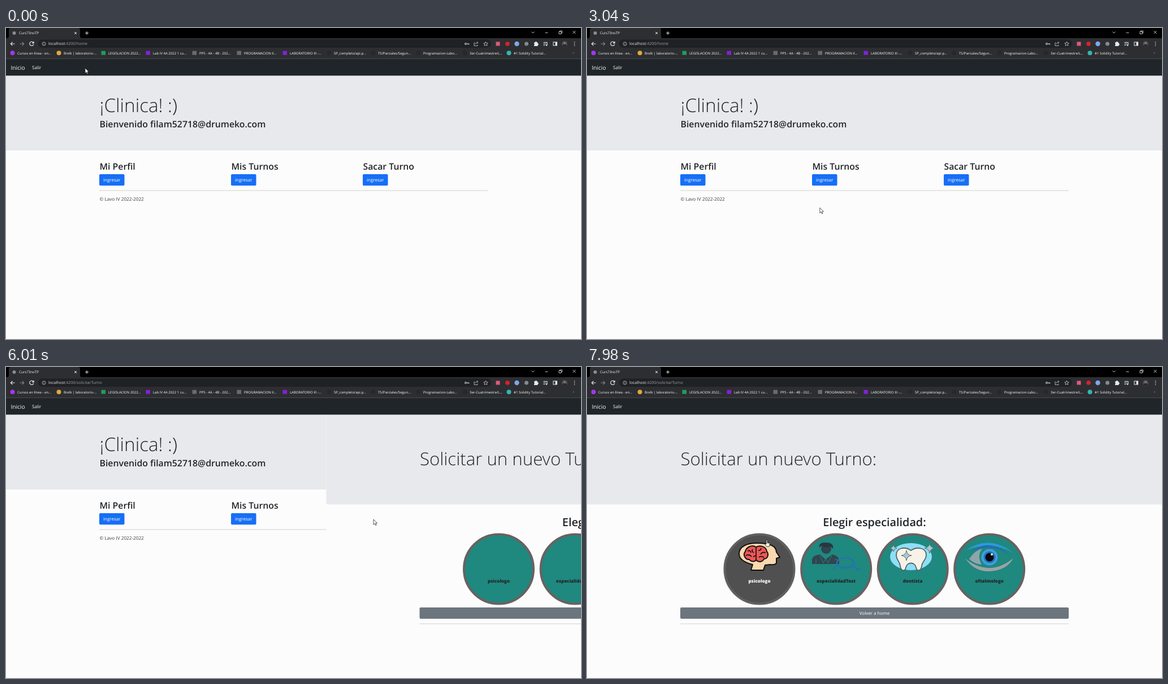
An HTML page for the animation above (8 s loop, 1017 px wide and 551 px high).

```html
<!DOCTYPE html>
<html lang="es">
<head>
<meta charset="utf-8">
<title>Clinica</title>
<style>
html, body { margin: 0; width: 100%; height: 100%; overflow: hidden; background: #fcfcfc; }
svg { display: block; width: 1017px; height: 551px; }
text { font-family: "Open Sans", "Noto Sans", sans-serif; text-rendering: geometricPrecision; white-space: pre; }
</style>
</head>
<body>
<svg id="stage" viewBox="0 0 1017 551"></svg>
<script>
const LOOP = 8000, CLICK = 5600, SLIDE = 5800, SLIDE_MS = 456.8, IMAGES = 6850;
const INK = '#212529', BLUE = '#166ff6', BAR = '#2d2e31', HERO = '#e8e9ec';

const text = (x, y, size, str, fill = INK, more = '') =>
  `<text x="${x}" y="${y}" font-size="${size}" fill="${fill}" ${more}>${str}</text>`;
const rect = (x, y, w, h, fill, more = '') =>
  `<rect x="${x}" y="${y}" width="${w}" height="${h}" fill="${fill}" ${more}/>`;
const dot = (x, y, r, fill, more = '') =>
  `<circle cx="${x}" cy="${y}" r="${r}" fill="${fill}" ${more}/>`;
const path = (d, fill = 'none', stroke = 'none', w = 1, more = '') =>
  `<path d="${d}" fill="${fill}" stroke="${stroke}" stroke-width="${w}" ${more}/>`;
const line = (d, color = '#e8eaed', w = 1) => path(d, 'none', color, w);
const MID = 'text-anchor="middle"';

// --- browser window ---
const bookmarks = [
  [20, 'Cursos en línea - en...', '#a435f0', 1],
  [102, 'Brelk | laboratorio-...', '#e0a83c', 1],
  [181, 'LEGISLACION 2022...', '#1e9e5a'],
  [260, 'Lab IV 4A 2022 1 cu...', '#8420d8'],
  [342, 'PPS - 4A - 4B - 202...', '#6a6b6e'],
  [421, 'PROGRAMACION II...', '#6a6b6e'],
  [502, 'LABORATORIO III -...', '#8420d8'],
  [580, 'SP_completo/api.p...', '#25282c', 1],
  [658, 'TS/Parciales/Segun...', '#25282c', 1],
  [738, 'Programacion-Labo...', '#25282c', 1],
  [820, '3er-Cuatrimestre/L...', '#25282c', 1],
  [898, '#1 Solidity Tutorial...', '#35b5b0', 1]
];

const chrome = () =>
  rect(0, 0, 1017, 18, '#000') +
  path('M2 18Q5 18 5 14V3Q5 0 9 0H127Q131 0 131 3V14Q131 18 134 18Z', BAR) +
  rect(0, 18, 1017, 37, BAR) +
  rect(57, 20.5, 801, 14.5, '#202124', 'rx="7.2"') +
  dot(14.5, 9, 3, '#8b8d90') +
  text(23, 11.2, 6.2, 'Curs73noTP', '#fff') +
  line('M121 7l4 4m0-4l-4 4M140 9h6m-3-3v6') +
  // window buttons
  line('M929.5 6.5l2.5 2.5 2.5-2.5M953.5 8.5h5M978 6.5h4v4h-4zM979.5 6.5v-1.5h4v4h-1.5M1002.5 5l5 5m0-5l-5 5', '#e8eaed', .8) +
  // navigation
  line('M15.5 28h-7m3-3.2l-3.2 3.2 3.2 3.2M48.6 26.2a3.6 3.6 0 1 0 .2 2.8M49 24v2.8h-2.8', '#e8eaed', 1.2) +
  line('M24.5 28h7m-3-3.2l3.2 3.2-3.2 3.2', '#85878a', 1.1) +
  dot(67, 28, 3.1, 'none', 'stroke="#c8cace" stroke-width=".8"') +
  line('M67 27.6v2.2M67 26v.8', '#c8cace', .8) +
  // address actions
  dot(813, 28, 1.5, 'none', 'stroke="#d0d2d5" stroke-width="1"') +
  line('M814.5 28h4.2v1.6M816.8 28v1.3', '#d0d2d5', 1.1) +
  line('M829 26h-1v5.5h6v-2M830 29q0-3 4.5-3m-1.7-1.7l2 1.7-2 1.7', '#d0d2d5', .8) +
  path('M848.5 24.3l1.1 2.5 2.7.2-2 1.8.6 2.6-2.4-1.4-2.4 1.4.6-2.6-2-1.8 2.7-.2z', 'none', '#d0d2d5', .8) +
  // extensions
  rect(866.5, 24.5, 7, 7, '#e0597c') + dot(887, 28, 3.8, '#d8222a') +
  dot(903.5, 28, 4.2, '#7fa6ea') + dot(920.5, 28, 3.5, '#85888c') +
  path('M934 25.5h2a1.4 1.4 0 0 1 2.8 0h1.7v2a1.4 1.4 0 0 1 0 2.8v1.7h-6.5v-2a1.3 1.3 0 0 0 0-2.4z', '#e8eaed') +
  line('M950.5 25.5h7M950.5 28h4.5M950.5 30.5h3M957 26v4.5', '#e8eaed', 1.1) +
  dot(956, 30.5, 1.2, '#e8eaed') +
  rect(968, 25, 6.5, 6, 'none', 'stroke="#e8eaed"') + rect(971.5, 25, 3, 6, '#e8eaed') +
  dot(988, 28, 4.8, '#55504d') + dot(988, 26.7, 1.7, '#8c8079') + path('M984.5 31q3.5-4 7 0-3.5 3-7 0', '#242426') +
  [25, 28, 31].map(y => dot(1005.5, y, .8, '#e8eaed')).join('') +
  bookmarks.map(([x, label, color, round]) =>
    (round ? dot(x - 8.5, 44.3, 4, color) : rect(x - 12.5, 40.7, 7.5, 7, color)) +
    text(x, 46.5, 6.03, label, '#fff')).join('') +
  text(1002, 46, 6.5, '»', '#85878a') +
  rect(0, 54, 1017, 1, '#4a4b4f') +
  rect(0, 55, 1017, 29.4, '#1f2528') +
  text(8.5, 73.8, 10.1, 'Inicio', '#fff') + text(46, 72.7, 8.15, 'Salir', '#fff');

// --- pages ---
const buttons = [[165, 'Mi Perfil'], [398, 'Mis Turnos'], [631, 'Sacar Turno']];
const home = () =>
  rect(0, 84, 1017, 133, HERO) +
  text(165.5, 148.5, 33.2, '¡Clinica! :)', INK, 'font-weight="300"') +
  text(165.5, 175.7, 15.8, 'Bienvenido filam52718@drumeko.com', INK, 'font-weight="600"') +
  buttons.map(([x, title], i) =>
    text(x + .5, 251, 15.8, title, INK, 'font-weight="600"') +
    rect(x - 1, 258, 46.5, 22.3, '#8bbaf9', `rx="3" id="ring${i}" visibility="hidden"`) +
    rect(x, 259, 44.5, 20.3, BLUE, `rx="2" id="btn${i}"`) +
    text(x + 22.2, 271.8, 8, 'ingresar', '#fff', MID)).join('') +
  rect(165, 287.5, 687, 1, '#cfcfc8') +
  text(165.5, 306, 8.2, '© Lavo IV 2022-2022', '#3a3e42');

const head = path('M290 360L293 350C281 347 269 342 269 331C269 317 284 312 301 312C322 312 335 317 335 328L341 337L335 339V347Q334 351 324 350L315 351L312 360Z', '#fbd9ae', '#111', 2, 'stroke-linejoin="round"') +
  path('M299 319C291 314 281 320 280 327C275 332 280 342 287 341C291 346 297 345 299 342C304 347 311 345 313 340C320 340 322 331 318 327C317 318 306 315 299 319Z', '#ef5656', '#111', 2) +
  line('M299 319V342M284 326q5-2 6 3M281 334q6-3 10 2M293 323q-3 3 2 6M294 336l5-2M303 325q5 0 5-4M316 329q-6-2-9 3M304 337q6-3 9 1', '#111', 1.7);
const doctor = dot(423, 322, 9, '#30454f') +
  path('M411 320Q409 311 422 311Q437 311 435 322L431 318Q421 321 414 317Z', '#273640') +
  path('M398 349V340Q399 334 412 332L422 341L434 332Q444 334 446 342V349Z', '#30454f') +
  line('M412 334l6 13 4-7 4 7 7-13M405 341v7M438 341h4', '#1f887f', 1) +
  path('M469 352L482 360', 'none', '#2373b0', 3) +
  `<ellipse cx="457" cy="347" rx="15" ry="9" fill="none" stroke="#2373b0" stroke-width="2.4"/>` +
  line('M440 352q-3 6-6 6', '#2373b0', 2);
const spark = (x, y, r) =>
  path(`M${x} ${y - r}Q${x + 1} ${y - 1} ${x + r} ${y}Q${x + 1} ${y + 1} ${x} ${y + r}Q${x - 1} ${y + 1} ${x - r} ${y}Q${x - 1} ${y - 1} ${x} ${y - r}Z`, '#a9c9cc', '#586b74', 1);
const tooth = `<ellipse cx="573" cy="336" rx="37" ry="24" fill="#8edff5"/>` +
  path('M573 325C561 317 547 321 547 333C547 342 553 344 554 352C555 362 563 363 564 355C566 345 580 345 582 355C583 363 591 362 592 352C593 344 600 342 600 333C600 321 585 317 573 325Z', '#f6f2e7', '#56636b', 1.8) +
  spark(606, 321, 9) + spark(565, 334, 9) + spark(542, 321, 6);
const eye = path('M670 325Q711 296 754 329Q713 306 670 325Z', '#2b9bdc') +
  path('M676 329Q711 301 747 332Q711 310 676 329Z', '#236fae') +
  path('M669 339Q688 367 721 361Q744 357 754 339Q731 357 709 356Q686 354 669 339Z', '#9ba3a7') +
  path('M676 340Q687 324 699 322Q689 334 698 350Q684 349 676 340Z', '#8fa5aa') +
  dot(712, 337, 14.5, '#409fdf') + dot(712, 337, 10.5, '#2473b9') +
  dot(712, 337, 7.5, '#080b10') + dot(716, 332, 2, '#d8efff');

const specialties = [[305, 'psicologo'], [440.7, 'especialidadTest'], [576.2, 'dentista'], [711.7, 'oftalmologo']];
const booking = () =>
  rect(0, 84, 1017, 467, '#fcfcfc') +
  path('M0 84H1017V243.5H3Q0 243.5 0 240.5Z', HERO) +
  text(165.5, 174, 31.2, 'Solicitar un nuevo Turno:', INK, 'font-weight="300"') +
  text(508.5, 281.7, 19.8, 'Elegir especialidad:', INK, `${MID} font-weight="600"`) +
  specialties.map(([x], i) =>
    dot(x, 358, 61.5, '#1f887f', `stroke="#6a6160" stroke-width="4" id="disc${i}"`)).join('') +
  `<g id="images">${head + doctor + tooth + eye}</g>` +
  specialties.map(([x, name], i) =>
    text(x, 382.4, 8, name, INK, `${MID} font-weight="800" id="name${i}"`)).join('') +
  rect(165, 426, 687, 20, '#6c757d', 'rx="2"') +
  text(508.5, 439, 8, 'Volver a home', '#fff', MID) +
  rect(165, 454.5, 687, 1, '#cfd0d2');

const arrow = path('M0 0V9.3L2.2 7.3L3.7 10.6L5.2 9.9L3.7 6.7H6.5Z', '#fff', '#111', .7);
const hand = path('M-1 .8Q0-.8 1 .8V5L4.5 5.7Q5.5 6 5.3 8L4.5 12H-.5L-3.3 8Q-3.5 6.5-1 8Z', '#fff', '#111', .8) +
  line('M1 5v2M2.7 5.5v1.7M4.2 6v1.4', '#111', .5);

document.getElementById('stage').innerHTML =
  rect(0, 0, 1017, 551, '#fcfcfc') + `<g id="home">${home()}</g><g id="booking">${booking()}</g>` +
  chrome() +
  `<text x="75" y="30.4" font-size="7.03" fill="#e8eaed">localhost<tspan fill="#9aa0a6">:4200/<tspan id="route"></tspan></tspan></text>` +
  `<g id="pointer"><g id="arrow">${arrow}</g><g id="hand">${hand}</g></g>`;

// --- motion ---
const $ = id => document.getElementById(id);
const show = (id, on) => $(id).setAttribute('visibility', on ? 'visible' : 'hidden');
const fill = (id, color) => $(id).setAttribute('fill', color);
const smooth = p => p * p * (3 - 2 * p);
const clamp = p => Math.max(0, Math.min(1, p));

// pointer stops: time, x, y
const stops = [
  [0, 140, 71], [40, 140, 71], [200, 160, 150], [370, 178, 220], [800, 186, 268], [1170, 205, 274],
  [1450, 232, 330], [1810, 247, 254], [2010, 262, 262], [2450, 345, 340], [2840, 405, 335],
  [3450, 432, 270], [4310, 432, 268], [4550, 432, 268], [5150, 648, 271], [5400, 653, 270],
  [5820, 653, 270], [6000, 650, 270], [7000, 650, 270], [7450, 420, 283], [7800, 318, 306], [8000, 318, 306]
];
function pointerAt(t) {
  const i = Math.max(1, stops.findIndex(s => s[0] > t));
  const [t0, x0, y0] = stops[i - 1], [t1, x1, y1] = stops[i];
  const p = smooth((t - t0) / (t1 - t0));
  return [x0 + (x1 - x0) * p, y0 + (y1 - y0) * p];
}

function draw(now) {
  const t = now % LOOP;
  const [x, y] = pointerAt(t);
  const shift = 1017 * (1 - smooth(clamp((t - SLIDE) / SLIDE_MS)));
  const covered = t >= SLIDE && x > shift;
  let link = false;

  buttons.forEach(([bx], i) => {
    const over = !covered && x > bx && x < bx + 44 && y > 259 && y < 279;
    const focus = i === 2 && t >= CLICK;
    fill('btn' + i, focus ? '#0b62c6' : over ? '#0b5ed7' : BLUE);
    show('ring' + i, focus && shift > 0);
    link ||= over;
  });
  specialties.forEach(([cx], i) => {
    const over = covered && Math.hypot(x - cx - shift, y - 358) < 63.5;
    fill('disc' + i, over ? '#505050' : '#1f887f');
    $('disc' + i).setAttribute('stroke', over ? '#625f5f' : '#6a6160');
    fill('name' + i, over ? '#fff' : INK);
    link ||= over;
  });

  show('booking', t >= SLIDE);
  show('home', shift > 0);
  show('images', t >= IMAGES);
  $('booking').setAttribute('transform', `translate(${shift} 0)`);
  $('route').textContent = t < CLICK ? 'home' : 'solicitarTurno';
  $('pointer').setAttribute('transform', `translate(${x} ${y})`);
  show('arrow', !link);
  show('hand', link);
}
const start = performance.now();
function tick() {
  draw(performance.now() - start);
  requestAnimationFrame(tick);
}
tick();
</script>
</body>
</html>
```
